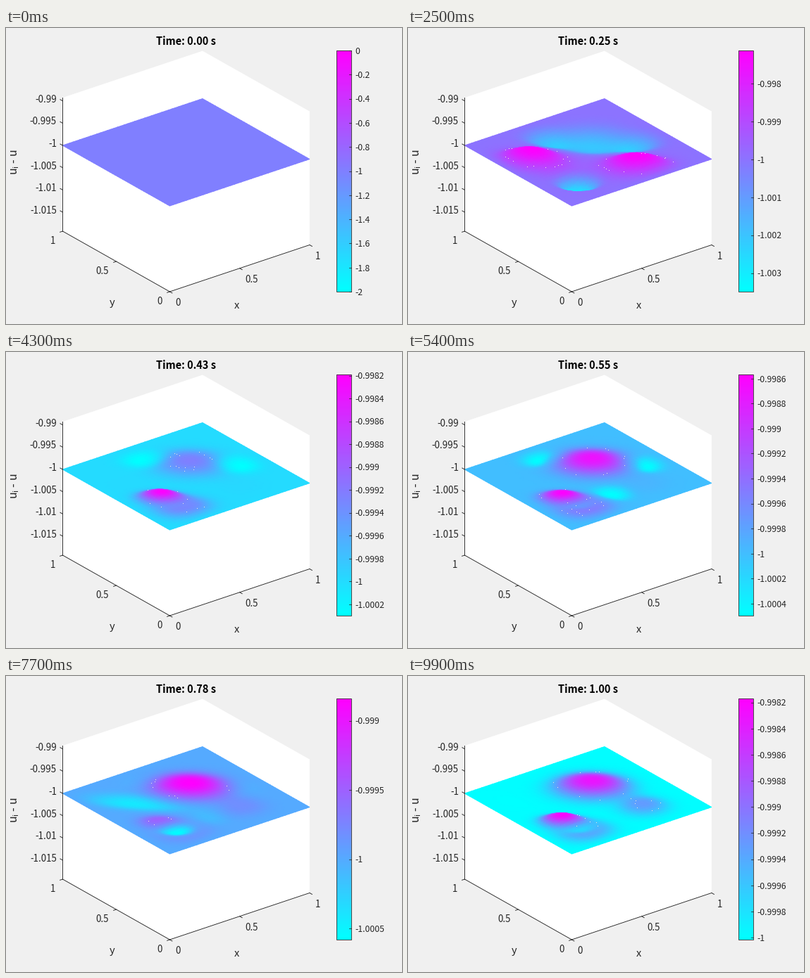
A matplotlib script for the animation above (10000 ms loop, 562 by 421 pixels).

```python
import numpy as np
import matplotlib.pyplot as plt
from matplotlib.animation import FuncAnimation

W, H, DPI, FRAMES = 562, 421, 64, 100
PT = 72 / DPI
INK = "#262626"

plt.rcParams["font.family"] = ["Noto Sans CJK JP", "DejaVu Sans"]

fig = plt.figure(figsize=(W / DPI, H / DPI), dpi=DPI, facecolor="#f0f0f0")
ax = fig.add_axes([0, 0, 1, 1])
ax.axis("off")
ax.set_autoscale_on(False)

# Orthographic view: front floor corner plus one screen vector per axis
ORIGIN = np.array([232.4, 375])
EX, EY = np.array([198.5, -66.5]), np.array([-152, -86])
FLOOR, TOP, Z_PX = -1.01927, -0.98926, 6330


def project(x, y, z):
    sx = ORIGIN[0] + EX[0] * x + EY[0] * y
    sy = ORIGIN[1] + EX[1] * x + EY[1] * y - Z_PX * (z - FLOOR)
    return sx, sy


def line(p, q, width=0.9):
    return ax.plot([p[0], q[0]], [p[1], q[1]], color=INK, lw=width * PT, zorder=5)[0]


def label(x, y, s, size=13.3, ha="left", **kw):
    kw = {"va": "baseline", "color": INK, **kw}
    return ax.text(x, y, s, fontsize=size * PT, ha=ha, zorder=6, **kw)


# Rows run from back to front so nearer cells cover farther ones
N = 42
axis = np.linspace(1, 0, N)
X, Y = np.meshgrid(axis, axis)
EDGE = (1 - (2 * X - 1) ** 8) * (1 - (2 * Y - 1) ** 8)


def bump(x, y, along, across):
    """Rounded hill, measured along and across the front-to-back diagonal."""
    d = (X - x + Y - y) / along
    c = (X - x - Y + y) / across
    return np.exp(-((d * d + c * c) / 4) ** 1.25)


def pair(x, y, along, across):
    return bump(x, y, along, across) + bump(y, x, along, across)


def pulse(t, mid, width):
    return np.exp(-((t - mid) / width) ** 2)


# Lowest and highest value (1e-3) at a few moments, joined geometrically
MOMENTS = np.array([1, 10, 25, 43, 66, 77, 99]) / (FRAMES - 1)
LOW = [19.3, 8.19, 3.49, .30, .86, .58, .015]
HIGH = [10.7, 3.72, 2.87, 1.81, 1.11, 1.16, 1.83]


def limit(t, values):
    return 1e-3 * np.exp(np.interp(t, MOMENTS, np.log(values)))


def wave(t):
    if t == 0:
        return np.zeros_like(X)
    early = pulse(t, 0, 0.15)
    late = 1 - np.exp(-(t / 0.3) ** 4)
    swing = late * (1.1 + 0.6 * np.cos(2 * np.pi * (t - 0.44) / 0.54))
    ring_down = 14 * np.exp(-t / 0.15) * np.cos(4 * np.pi * t)
    mid = 0.615 + 0.12 * early

    # the deep middle dip relaxes into a hill, the front corner rings down
    w = (1.7 - 20 * np.exp(-t / 0.14)) * bump(mid, mid, 0.12, 0.15 + 0.08 * early)
    w += 3.4 * early * bump(0.4, 0.4, 0.2, 0.36)
    w += (ring_down - 0.9 * late) * bump(0.22, 0.23, 0.06, 0.075)
    w += swing * (bump(0.2, 0.36, 0.06, 0.085) + 0.6 * bump(0.22, 0.19, 0.1, 0.12))

    # side swells and the troughs around them
    w += 2.6 * pulse(t, 0.22, 0.09) * pair(0.15, 0.6, 0.09, 0.13)
    w -= 4.5 * np.exp(-t / 0.2) * (1 - early) * pair(0.45, 0.82, 0.08, 0.09)
    w -= 0.4 * pulse(t, 0.8, 0.09) * bump(0.28, 0.64, 0.07, 0.22)
    w -= 0.55 * pulse(t, 0.65, 0.1) * bump(0.46, 0.24, 0.08, 0.08)
    w += 0.7 * t ** 4 * bump(0.695, 0.236, 0.09, 0.1)
    w *= EDGE
    return np.where(w > 0, w * limit(t, HIGH) / w.max(), -w * limit(t, LOW) / w.min())


# Box walls, axes and fixed labels
corners = [(0, 1, TOP), (1, 1, TOP), (1, 0, TOP), (1, 0, FLOOR), (0, 0, FLOOR), (0, 1, FLOOR)]
ax.add_patch(plt.Polygon([project(*c) for c in corners], fc="white", ec="none", zorder=0))

left, front, right = (project(*p, FLOOR) for p in [(0, 1), (0, 0), (1, 0)])
line(project(0, 1, TOP), left)
line(left, front)
line(front, right)


def tick(p, step, text, offset, ha="right"):
    line(p, (p[0] + step[0], p[1] + step[1]))
    label(p[0] + offset[0], p[1] + offset[1], text, ha=ha)


for k in range(6):
    z = -0.99 - 0.005 * k
    tick(project(0, 1, z), (-3.5, -2), f"{z:g}", (-8.4, 2))
for v in (0, 0.5, 1):
    tick(project(0, v, FLOOR), (-3.8, 1.3), f"{v:g}", (-10.4, 18))
    tick(project(v, 0, FLOOR), (3.5, 2), f"{v:g}", (7.8, 20.3), "left")
label(151, 394.5, "y", 14.6, "center")
label(327, 399, "x", 14.6, "center")
label(13, 191, r"u$_{\mathregular{i}}$ - u", 16, "center", va="center", rotation=90)
title = label(255.5, 24, "", 14.6, "center", weight="bold", color="black")

# Colour bar
BX0, BX1, BY0, BY1 = 469, 490, 32, 375
ax.imshow(np.linspace(1, 0, 256)[:, None], cmap="cool", aspect="auto",
          extent=(BX0, BX1, BY1, BY0), zorder=1)
ax.set(xlim=(0, W), ylim=(H, 0))
ax.add_patch(plt.Rectangle((BX0, BY0), BX1 - BX0, BY1 - BY0, fill=False,
                           ec=INK, lw=0.8 * PT, zorder=4))


def tick_step(span):
    base = 10 ** np.floor(np.log10(span) + 1e-9)
    m = span / base
    if m < 1.5 or 1.8 <= m < 2.5:
        return 0.2 * base
    return (0.5 if m < 5 else 1) * base


def bar_ticks(low, high):
    made = []
    step = tick_step(high - low)
    for k in range(int(np.ceil(low / step - 1e-6)), int(np.floor(high / step + 1e-6)) + 1):
        y = BY1 - (k * step - low) / (high - low) * (BY1 - BY0)
        made.append(line((BX1 - 3, y), (BX1, y), 0.8))
        made.append(label(495, y + 4.8, f"{k * step:.6g}", 12.2))
    return made


def pinholes(w, sx, sy, i):
    """Tiny gaps between cells along the foot of the waves."""
    rng = np.random.default_rng(i)
    near = np.abs(w - 0.3 * w.max()) < 0.07 * np.ptp(w)
    near &= np.maximum(np.abs(X - 0.5), np.abs(Y - 0.5)) < 0.47
    near &= rng.random(w.shape) < 0.12
    return ax.plot(sx[near], sy[near], ",", color="#ece6dc", zorder=3)[0]


moving = []


def draw(i):
    while moving:
        moving.pop().remove()
    t = i / (FRAMES - 1)
    title.set_text(f"Time: {t:.2f} s")
    w = wave(t)
    low, high = (w.min() - 1, w.max() - 1) if i else (-2, 0)
    sx, sy = project(X, Y, w - 1)
    moving.append(ax.pcolormesh(sx, sy, w - 1, cmap="cool", vmin=low, vmax=high,
                                shading="gouraud", zorder=2))
    if i:
        moving.append(pinholes(w, sx, sy, i))
    moving.extend(bar_ticks(low, high))
    return moving


anim = FuncAnimation(fig, draw, frames=FRAMES, interval=100, repeat=True,
                     repeat_delay=0, init_func=lambda: [])
plt.show()
```
